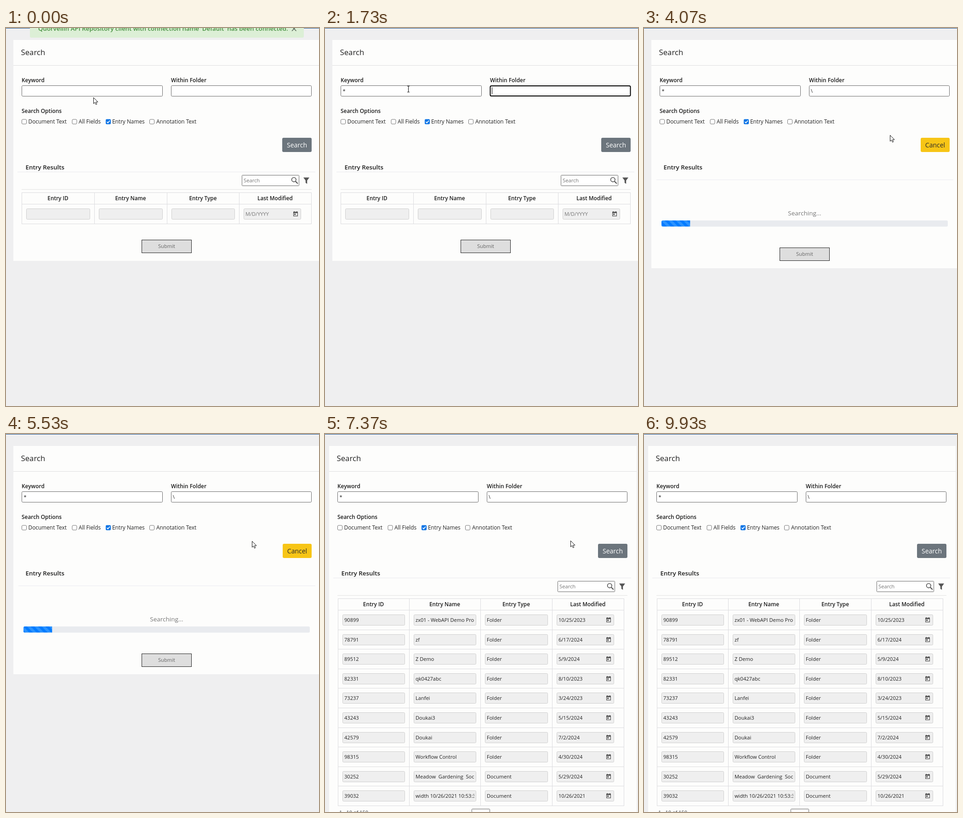
Write an HTML page that moves like this. It is 681 px wide and 823 px high and loops after 9960 ms.

```html
<!DOCTYPE html>
<html lang="en">
<head>
<meta charset="utf-8">
<title>Repository search</title>
<style>
  html, body { margin: 0; width: 100%; height: 100%; overflow: hidden; background: #efeff0; }
  #stage { display: block; width: 681px; height: 823px; font-family: "Open Sans", sans-serif; }
  text { white-space: pre; }
</style>
</head>
<body>
<svg id="stage" viewBox="0 0 681 823" xmlns="http://www.w3.org/2000/svg"></svg>
<script>
const LOOP = 9960;
const CLICK = 3350, FILL = 6050, RESULTS = 6960;
const stage = document.getElementById('stage');

const text = (x, y, size, s, { fill = '#222', weight = 400, anchor = 'start', id = '' } = {}) =>
  `<text ${id && `id="${id}"`} x="${x}" y="${y}" font-size="${size}" font-weight="${weight}" fill="${fill}" text-anchor="${anchor}">${s}</text>`;
const bold = (x, y, size, s, anchor) => text(x, y, size, s, { weight: 600, fill: '#1b1b1b', anchor });
const rect = (x, y, w, h, fill, extra = '') =>
  `<rect x="${x}" y="${y}" width="${w}" height="${h}" fill="${fill}" ${extra}/>`;
// box outlined on whole pixels, given by its outer edges
const box = (x1, y1, x2, y2, fill, stroke, r = 1) =>
  rect(x1 + .5, y1 + .5, x2 - x1 - 1, y2 - y1 - 1, fill, `stroke="${stroke}" rx="${r}"`);
const hline = (x1, x2, y, color) => rect(x1, y, x2 - x1, 1, color);
const vline = (x, y1, y2, color) => rect(x, y1, 1, y2 - y1, color);
const group = (id, body) => `<g id="${id}">${body}</g>`;

function checkbox(x, label, labelX, on) {
  const mark = on
    ? rect(x, 198.5, 11, 11, '#0b74e5', 'rx="2"') +
      `<path d="M${x + 2.4} 204.2l2.3 2.4 4.2-5" fill="none" stroke="#fff" stroke-width="1.7"/>`
    : box(x, 198.5, x + 11, 209.5, '#fff', '#767676', 2);
  return mark + text(labelX, 208, 11.85, label);
}

function calendar(x, y) {
  return `<g fill="#555"><path d="M${x} ${y + 1}h10v10h-10zM${x + 1.2} ${y + 4}v5.8h7.6v-5.8z" fill-rule="evenodd"/>` +
    rect(x + 1.5, y, 1.5, 2, '#555') + rect(x + 7, y, 1.5, 2, '#555') +
    rect(x + 2.2, y + 5, 3, 3, '#555') + '</g>';
}

function cell(x1, x2, y, s, fill) {
  return box(x1, y, x2, y + 24, '#efefef', '#cfcfcf', 2) +
    `<svg x="${x1 + 3}" y="${y}" width="${x2 - x1 - 7}" height="24">${text(1, 16, 11.05, s, { fill })}</svg>`;
}

// edges: left, column lines, right
function table(edges, rows, step, hint) {
  const line = '#dcdcdf', top = 358, head = 383;
  const bottom = Math.round(head + step * rows.length);
  let out = '';
  edges.forEach(x => out += vline(x, top, bottom + 1, line));
  const last = edges.length - 1;
  out += hline(edges[0], edges[last], top, line) + hline(edges[0], edges[last], head, line);
  ['Entry ID', 'Entry Name', 'Entry Type', 'Last Modified'].forEach((name, i) =>
    out += bold((edges[i] + edges[i + 1]) / 2, 375, 11.75, name, 'middle'));
  rows.forEach((row, k) => {
    const y = Math.round(393 + k * step);
    out += hline(edges[0], edges[last], Math.round(head + (k + 1) * step), line);
    row.forEach((s, i) => {
      const x1 = edges[i] + 10;
      const x2 = i < 3 ? edges[i + 1] - 9 : x1 + 125;
      out += cell(x1, x2, y, s, hint ? '#777' : '#222');
      if (i === 3) out += calendar(x1 + 108, y + 6);
    });
  });
  return out;
}

const rows = [
  ['90899', 'zx01 - WebAPI Demo Product', 'Folder', '10/25/2023'],
  ['78791', 'zf', 'Folder', '6/17/2024'],
  ['89512', 'Z Demo', 'Folder', '5/9/2024'],
  ['82331', 'qk0427abc', 'Folder', '8/10/2023'],
  ['73237', 'Lanfei', 'Folder', '3/24/2023'],
  ['43243', 'Doukai3', 'Folder', '5/15/2024'],
  ['42579', 'Doukai', 'Folder', '7/2/2024'],
  ['98315', 'Workflow Control', 'Folder', '4/30/2024'],
  ['30252', 'Meadow  Gardening  Society', 'Document', '5/29/2024'],
  ['39032', 'width 10/26/2021 10:53:33', 'Document', '10/26/2021']
];

const submit = y => box(295, y, 404, y + 29, '#dedede', '#222', 0) +
  text(349.5, y + 18, 11.2, 'Submit', { fill: '#666', anchor: 'middle' });

const form =
  rect(16, 26, 669, 481, '#fdfdfc', 'id="card"') +
  text(32.5, 59, 16.8, 'Search') + hline(16, 685, 81, '#dfdfdf') +
  bold(34, 118, 11.9, 'Keyword') + bold(359, 118, 11.9, 'Within Folder') +
  box(34, 125, 341, 149, '#fff', '#6b6b6b', 2) + box(359, 125, 665, 149, '#fff', '#6b6b6b', 2) +
  rect(0, 126, 305, 22, '#fff', 'id="focus" stroke="#000" stroke-width="2" rx="2.5"') +
  text(38.5, 141, 11, '*', { id: 'star' }) + text(363, 141, 11, '\\', { id: 'slash' }) +
  rect(0, 129, 1, 15, '#000', 'id="caret"') +
  bold(34, 185, 11.9, 'Search Options') +
  checkbox(34, 'Document Text', 48.5) + checkbox(143.5, 'All Fields', 158) +
  checkbox(217, 'Entry Names', 231, true) + checkbox(312, 'Annotation Text', 327) +
  group('searchBtn', rect(601, 239, 64, 31, '#6c757d', 'id="btnFace" rx="3"') +
    text(633, 260, 14, 'Search', { fill: '#fff', anchor: 'middle' })) +
  group('cancelBtn', rect(602, 239, 63, 31, '#f7c516', 'rx="3"') +
    text(633.5, 260, 14, 'Cancel', { fill: '#2b2b2b', anchor: 'middle' })) +
  bold(42.5, 308, 13.4, 'Entry Results') +
  group('tools', hline(25, 673, 313, '#e9e9ee') + hline(34, 665, 351, '#e2e2e2') +
    box(513, 320, 638, 344, '#fff', '#6b6b6b', 1) +
    text(517, 336, 11.2, 'Search', { fill: '#757575' }) +
    '<g fill="none" stroke="#555"><circle cx="626.3" cy="330.2" r="4.7" stroke-width="1.7"/>' +
    '<path d="M629.8 333.7l5 5" stroke-width="2.2"/></g>' +
    '<path d="M647 325.5h13l-4.8 6.5v7.3l-3.4-2.4v-4.9z" fill="#555"/>');

const progress =
  hline(27, 673, 330, '#ececf1') +
  text(349.5, 408, 13.5, 'Searching...', { fill: '#777', anchor: 'middle' }) +
  rect(38, 419, 623, 13.5, '#e9ebef', 'rx="3"') +
  '<g clip-path="url(#track)">' +
  rect(38, 419, 0, 13.5, 'url(#stripes)', 'id="bar"') + '</g>' + submit(478);

const banner =
  rect(52, -19, 596, 40, '#dcefd6', 'rx="3"') +
  text(70, 6, 13.33, "Quorvellin API Repository client with connection name 'Default' has been connected.",
    { weight: 600, fill: '#45903f' }) +
  '<path d="M622 -3l9.5 9.5M631.5 -3l-9.5 9.5" stroke="#5f6f5f" stroke-width="1.7"/>';

stage.innerHTML =
  `<defs><clipPath id="track">${rect(38, 419, 623, 13.5, '#000', 'rx="3"')}</clipPath>
  <pattern id="stripes" width="16" height="16" patternUnits="userSpaceOnUse">
    ${rect(0, 0, 16, 16, '#007bff')}
    <path d="M0 16h8l-8 -8zM0 0h8l8 8v8z" fill="#2a92ff"/>
  </pattern></defs>` +
  rect(0, 0, 681, 823, '#efeff0') + hline(0, 681, 0, '#265c97') +
  group('form', form) +
  group('empty', table([34, 192, 350, 507, 664], [['', '', '', 'M/D/YYYY']], 42.6, true) + submit(461)) +
  group('progress', progress) +
  group('results', table([28, 183, 338, 494, 650], rows, 42.6) +
    text(31, 828, 11, '1 - 10 of 150', { fill: '#444' }) + box(319, 816, 359, 842, '#fff', '#666', 1)) +
  group('banner', banner) +
  group('pointer', '<path id="arrow" d="M.5 .5v13.2l3-2.8 2.1 4.8 2.2-1-2.1-4.6h4.3z" fill="#fff" stroke="#111"/>' +
    '<path id="ibeam" d="M-2.5 -6.5h2l.5.5.5-.5h2M0 -6v12M-2.5 6.5h2l.5-.5.5.5h2" fill="none" stroke="#111" stroke-width="1.1"/>');

const ui = {};
stage.querySelectorAll('[id]').forEach(el => ui[el.id] = el);

const set = (el, attrs) => { for (const k in attrs) el.setAttribute(k, attrs[k]); };
const show = (el, on) => el.setAttribute('visibility', on ? 'visible' : 'hidden');
const clamp = v => Math.min(1, Math.max(0, v));
const span = (t, a, b) => clamp((t - a) / (b - a));
const ease = v => v * v * (3 - 2 * v);

// time, x, y
const path = [
  [250, 190, 151], [600, 181, 133], [2400, 181, 133], [3050, 618, 256], [3450, 618, 256],
  [3950, 535, 233], [7300, 535, 233], [7900, 501, 211], [9150, 501, 211], [9600, 508, -24]
];

function pointerAt(t) {
  let [, x, y] = path[0];
  for (let i = 1; i < path.length; i++) {
    const [t0, x0, y0] = path[i - 1], [t1, x1, y1] = path[i];
    if (t < t0) break;
    const k = ease(span(t, t0, t1));
    x = x0 + (x1 - x0) * k;
    y = y0 + (y1 - y0) * k;
  }
  return [x, y];
}

function draw(t) {
  const busy = t >= CLICK && t < RESULTS;
  const done = t >= RESULTS;

  set(ui.form, { transform: `translate(${done ? -7 : 0} 0)` });
  set(ui.card, { height: done ? 800 : busy ? 497 : 481 });
  show(ui.empty, !busy && !done);
  show(ui.progress, busy);
  show(ui.results, done);
  show(ui.tools, !busy);
  show(ui.searchBtn, !busy);
  show(ui.cancelBtn, busy);

  const gone = span(t, 600, 1300);
  set(ui.banner, { opacity: 1 - gone });

  // field focus, typed text and blinking caret
  const inKeyword = t >= 700 && t < 1550;
  const inFolder = t >= 1550 && t < CLICK;
  const typed = t >= 1150, slashed = t >= 2250;
  const since = inKeyword ? t - (typed ? 1150 : 700) : t - (slashed ? 2250 : 1550);
  show(ui.focus, inKeyword || inFolder);
  set(ui.focus, { x: inKeyword ? 35 : 359.5 });
  show(ui.star, typed);
  show(ui.slash, slashed);
  show(ui.caret, (inKeyword || inFolder) && since % 1000 < 500);
  set(ui.caret, { x: inKeyword ? (typed ? 45 : 38) : (slashed ? 368 : 363) });

  const part = .1 * ease(span(t, CLICK, CLICK + 500)) + .9 * ease(span(t, FILL, FILL + 600));
  set(ui.bar, { width: 623 * part });
  set(ui.stripes, { patternTransform: `translate(${38 - 16 * (t % 1000) / 1000} 419)` });

  const [x, y] = pointerAt(t);
  const overField = y > 125 && y < 149 && (x > 34 && x < 341 || x > 359 && x < 665);
  const overBtn = x > 601 && x < 665 && y > 239 && y < 270;
  set(ui.pointer, { transform: `translate(${Math.round(x) + (overField ? .5 : 0)} ${Math.round(y)})` });
  show(ui.arrow, !overField);
  show(ui.ibeam, overField);
  set(ui.btnFace, { fill: overBtn ? '#5a6268' : '#6c757d' });
}

let start;
function tick(now) {
  start ??= now;
  draw((now - start) % LOOP);
  requestAnimationFrame(tick);
}
draw(0);
requestAnimationFrame(tick);
</script>
</body>
</html>
```
